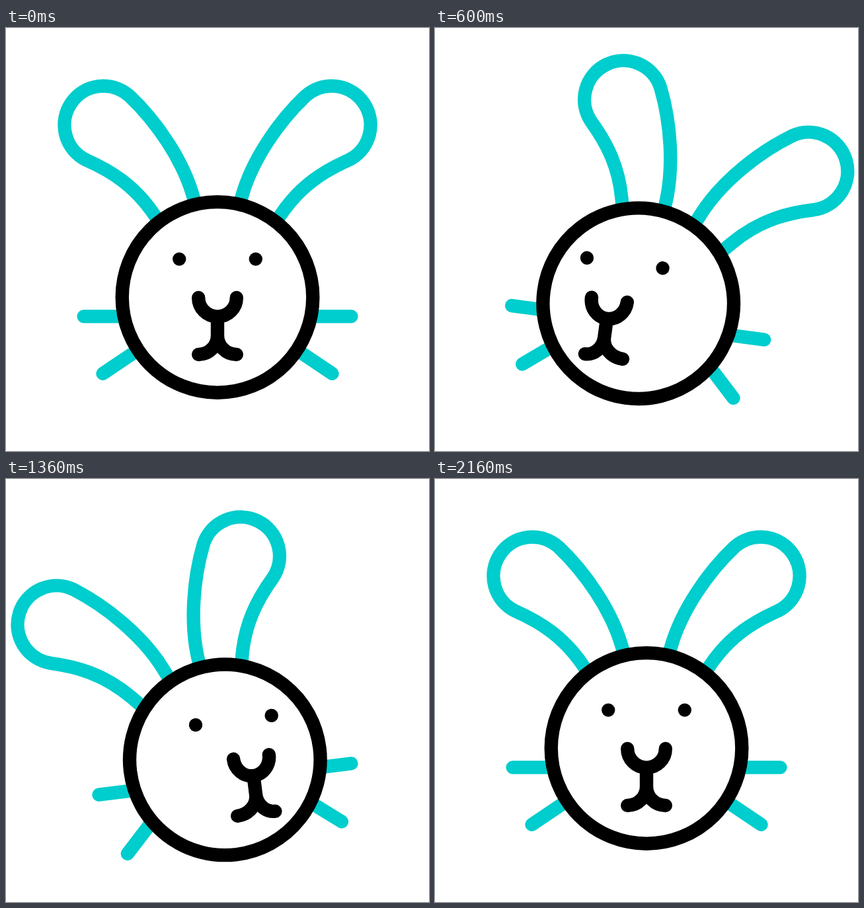
Write an HTML page that moves like this. It is 640 px wide and 640 px high and loops after 2.24 s.

```html
<!DOCTYPE html>
<html lang="en">
<head>
<meta charset="utf-8">
<title>Rabbit shaking its head</title>
<style>
  html, body { margin: 0; width: 100%; height: 100%; overflow: hidden; background: #fff; }
  svg { display: block; width: 100vw; height: 100vh; }
  .line { fill: none; stroke: #000; stroke-width: 20.4; stroke-linecap: round; stroke-linejoin: round; }
  .teal { stroke: #00cdcd; }
</style>
</head>
<body>
<svg viewBox="0 0 640 640">
  <defs>
    <path id="ear" transform="translate(-320 -407.4)"
      d="M291 284 L284 258 C268 198 225 139 187 103 A59 59 0 1 0 122 200 C158 216 195 238 226 285 L241 308"/>
  </defs>
  <!-- Drawn around the centre of the face; the right side mirrors the left. -->
  <g id="head">
    <g class="line teal">
      <g><use href="#ear" id="earL"/><path id="whiskersL"/></g>
      <g transform="scale(-1 1)"><use href="#ear" id="earR"/><path id="whiskersR"/></g>
    </g>
    <circle class="line" r="144.3" style="fill:#fff"/>
    <g id="eyes"><circle cx="-57.8" cy="-57.8" r="10.2"/><circle cx="57.8" cy="-57.8" r="10.2"/></g>
    <path id="mouth" class="line"/>
  </g>
</svg>
<script>
const LOOP = 2240, STEP = 40, END = 2160;
const CENTER = { x: 320, y: 407.4 }, PIVOT = 92;

const ease = (t, from, to) => {
  const u = Math.min(1, Math.max(0, (t - from) / (to - from)));
  return u * u * (3 - 2 * u);
};

// sway: 0, 1 at the right, -1 at the left, 0.  hold: 0, 1 while turned, 0.
const swing = (t, start, right, left) => {
  const out = ease(t, start, right), back = ease(t, left, END);
  return { sway: out - 2 * ease(t, right, left) + back, hold: out - back };
};

const set = (id, attr, value) => document.getElementById(id).setAttribute(attr, value);

// dir is 1 on the left and -1 on the mirrored right side.
function drawSide(side, dir, head, ears) {
  const e = dir * ears.sway, h = dir * head.sway;
  set("ear" + side, "transform",
    `translate(${5.6 * e - 10.5 * ears.hold} ${4.8 * e}) rotate(${7 * ears.hold + 17.3 * e})`);

  const angle = (34 + 8 * head.hold - 3.5 * h) * Math.PI / 180;
  const upper = -202.4 + 10 * head.hold + 3.5 * h;
  const lowerX = -173.5 + 11 * head.hold + 1.3 * head.sway;
  const lowerY = 115.5 + 3.2 * head.hold - 4.2 * h;
  set("whiskers" + side, "d",
    `M${upper} 29 H-130 M${lowerX} ${lowerY} l${60 * Math.cos(angle)} ${-60 * Math.sin(angle)}`);
}

function drawFace({ sway, hold }) {
  set("eyes", "transform", `translate(${-4.6 * hold - 25 * sway} 0)`);

  const r = 28.8, w = r - 1.7 * hold;
  const x = -2.9 * hold - 43 * sway, lag = -0.07 * x;
  set("mouth", "d",
    `M${x - w} .5 A${w} ${r} 0 0 0 ${x + w} .5 M${x} 29.3 v28.5 ` +
    `a${r - lag} ${r} 0 0 1 ${lag - r} ${r} M${x} 57.8 a${r + lag} ${r} 0 0 0 ${r + lag} ${r}`);
}

function draw(t) {
  const head = swing(t, 0, 680, 1380);
  const ears = swing(t, 80, 700, 1440);
  const bob = 21.9 * (ease(t, 240, 1000) - ease(t, 1160, 1920));
  const tilt = 0.45 * head.hold + 7.55 * head.sway;
  set("head", "transform",
    `translate(${CENTER.x} ${CENTER.y - PIVOT + bob}) rotate(${tilt}) translate(0 ${PIVOT})`);
  drawSide("L", 1, head, ears);
  drawSide("R", -1, head, ears);
  drawFace(head);
}

const start = performance.now();
function tick() {
  const t = Math.max(0, performance.now() - start) % LOOP;
  draw(Math.min(END, Math.floor(t / STEP) * STEP));
  requestAnimationFrame(tick);
}
tick();
</script>
</body>
</html>
```
